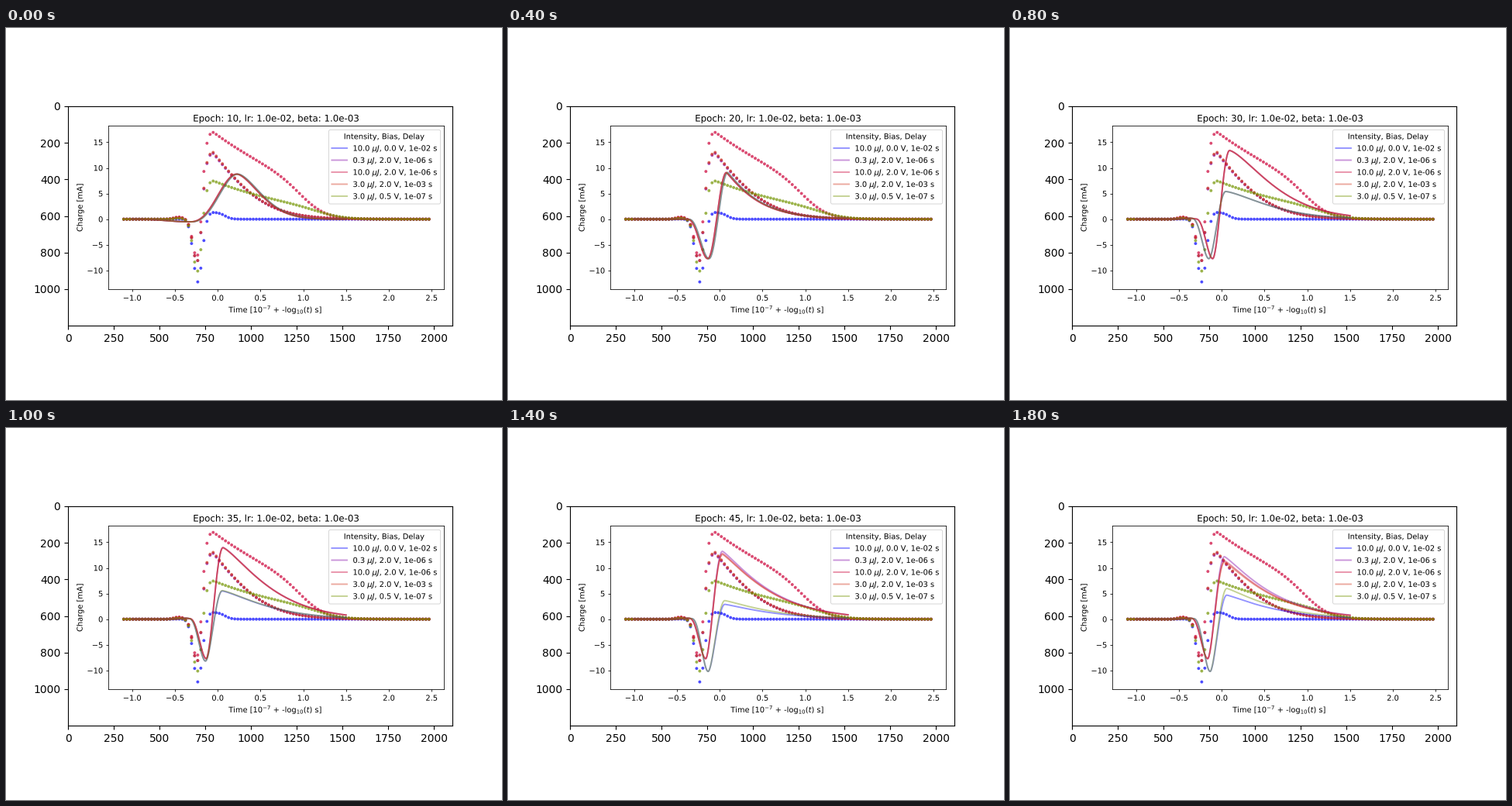
A matplotlib script that plays this animation: 640x480 px, repeating every 2000 ms.

```python
import matplotlib.pyplot as plt
import numpy as np
from matplotlib.animation import FuncAnimation
from matplotlib.lines import Line2D
from matplotlib.patches import FancyBboxPatch
from matplotlib.patheffects import Normal
from matplotlib.transforms import Affine2D

W, H, DPI = 640, 480, 100
EM = 496 / 700 * 10          # inner font size in points
PT = 72 / DPI                # points per pixel

# Label parts, colour, then the measured pulse:
# peak, dip, fade centre, fade width, slow decay
SERIES = [
    (("10.0", "0.0", "1e-02"), (0, 0, 1), (1.35, 12.4, 33, 1, 33)),
    (("0.3", "2.0", "1e-06"), (.5, 0, .65), (12.9, 9.6, 38, 9, 33)),
    (("10.0", "2.0", "1e-06"), (.8, 0, .22), (17, 9, 59, 4.2, 38)),
    (("3.0", "2.0", "1e-03"), (.82, .2, .1), (13.1, 9.6, 38, 9, 33)),
    (("3.0", "0.5", "1e-07"), (.45, .58, 0), (7.5, 11, 65, 4.5, 31)),
]
WEAK = (0, 4)
SPREAD = (0, .8, 0, -.3, 1.3)       # how far the peaks drift apart at the end
EPOCHS = sorted(range(5, 51, 5), key=str)    # alphabetical order of names


def ease(u, power=1):
    return (1 - np.cos(np.pi * np.clip(u, 0, 1) ** power)) / 2


def bell(x, mid, width):
    return np.exp(-((x - mid) / width) ** 2 / 2)


def pulse(i, peak, dip, centre, width, decay):
    """Measured signal: a sharp dip, a fast rise, then a slow fade."""
    rise = 1 / (1 + np.exp(-(i - 25.25) / .62))
    late = np.clip(i, 29, None)
    fade = np.exp((29 - late) / decay) / (1 + np.exp((late - centre) / width))
    fade *= 1 + np.exp((29 - centre) / width)
    return (peak * (rise * fade + .025 * bell(i, 17.8, 1.5))
            - dip * bell(i, 24.05, 1.48))


def fit(t, epoch, k):
    """Model curve: ease down to a dip, up to a peak, then a stretched tail."""
    weak = k in WEAK
    young = np.exp(-(epoch - 5) / 4.5)
    shift = np.interp(epoch, (20, 30, 40),
                      (.015, -.015, 0) if weak else (0, .03, -.028))

    dip_t = -.135 - 1.165 * young ** 1.6 + shift
    onset = dip_t - .19 - 1.4 * young
    dip = -7.7 * ease((epoch - 8) / 12)
    if weak:
        dip -= 2.5 * ease((epoch - 33) / 7)

    peak_t = .06 + .49 * young + shift
    peak = np.interp(epoch, (5, 10, 20, 30, 40, 45, 50),
                     (5.2, 8.8, 9.1, 5.4, 5.6, 2.9, 4.7) if weak else
                     (5.2, 8.8, 9.1, 13.4, 14.5, 12.8, 11.4))
    peak += SPREAD[k] * (max(epoch - 30, 0) / 20) ** 2

    ages = (5, 10, 20, 30, 40)
    scale = np.interp(epoch, ages, (.665, .38, .385, .65, .63))
    power = np.interp(epoch, ages, (2.25, 1.65, 1.1, 1.4, 1.18))

    fall = dip * ease((t - onset) / (dip_t - onset), 1.2)
    climb = ease((t - dip_t) / (peak_t - dip_t), .85 + .6 * young ** .4)
    tail = peak * np.exp(-(np.clip(t - peak_t, 0, None) / scale) ** power)
    bump = .2 * ease((epoch - 20) / 10) * bell(t, -.38, .05)
    return np.where(t < peak_t, fall + (peak - dip) * climb, tail) + bump


fig = plt.figure(figsize=(W / DPI, H / DPI), dpi=DPI, facecolor="white")
px = Affine2D().scale(1 / W, -1 / H).translate(0, 1) + fig.transFigure


def write(x, y, text, ha="center", size=EM, rotation=0):
    return fig.text(x, y, text, transform=px, ha=ha, va="baseline",
                    fontsize=size, rotation=rotation,
                    rotation_mode="anchor", path_effects=[Normal()])


# Outer picture frame
outer = fig.add_subplot()
outer.set(xlim=(-.5, 2099.5), ylim=(1199.5, -.5), aspect="equal")
outer.set_xticks(range(0, 2001, 250))
outer.set_yticks(range(0, 1001, 200))

# Inner chart
LEFT, RIGHT, TOP, BOTTOM = 132.2, 565.4, 126.5, 336.8
X0, Y0, X_UNIT, Y_UNIT = 273.2, 246.7, 110.4, 6.615
ax = fig.add_axes([LEFT / W, 1 - BOTTOM / H,
                   (RIGHT - LEFT) / W, (BOTTOM - TOP) / H])
ax.set_xlim((LEFT - X0) / X_UNIT, (RIGHT - X0) / X_UNIT)
ax.set_ylim((Y0 - BOTTOM) / Y_UNIT, (Y0 - TOP) / Y_UNIT)
ax.set_xticks(np.arange(-1, 2.6, .5))
ax.set_yticks(np.arange(-10, 16, 5))
ax.tick_params(length=.35 * EM, width=.08 * EM,
               labelbottom=False, labelleft=False)
for spine in ax.spines.values():
    spine.set_linewidth(.08 * EM)

for v in ax.get_xticks():
    write(X0 + v * X_UNIT, 351.7, f"{v:.1f}".replace("-", "\u2212"))
for v in ax.get_yticks():
    write(125.3, Y0 - v * Y_UNIT + 3.7, f"{v:.0f}".replace("-", "\u2212"),
          ha="right")
title = write(348.2, 120.6, "", size=1.2 * EM)
write(348.2, 367, r"Time [10$^{-7}$ + -log$_{10}$($t$) s]")
write(98.6, 231.6, "Charge [mA]", rotation=90)

# Legend box
fig.add_artist(FancyBboxPatch(
    (418.5, 133.4), 140.1, 91.6, boxstyle="round,pad=2,rounding_size=2",
    transform=px, fc="white", ec="0.8", lw=.1 * EM, alpha=.8))
write(488.2, 143.3, "Intensity, Bias, Delay")

# Dots, fitted lines and legend rows
i = np.arange(100)
samples = np.linspace((151.9 - X0) / X_UNIT, (545.8 - X0) / X_UNIT, 100)
t = np.linspace(-1, 1.5, 500)
lines = []
for k, ((energy, bias, delay), color, shape) in enumerate(SERIES):
    style = dict(color=color, lw=1.9 * PT, alpha=.42,
                 solid_capstyle="projecting")
    ax.scatter(samples, pulse(i, *shape), s=np.full(100, (3.9 * PT) ** 2),
               color=[color], alpha=.7, linewidths=0)
    lines += ax.plot([], [], **style)

    y = 155 + 15.5 * k
    fig.add_artist(Line2D([420.4, 440], [y, y], transform=px, snap=False,
                          **style))
    write(447.5, y + 3.6, rf"{energy} $\mu J$, {bias} V, {delay} s", ha="left")


def update(frame):
    epoch = EPOCHS[frame]
    for k, line in enumerate(lines):
        line.set_data(t, fit(t, epoch, k))
    title.set_text(f"Epoch: {epoch}, lr: 1.0e-02, beta: 1.0e-03")
    return [*lines, title]


anim = FuncAnimation(fig, update, frames=len(EPOCHS), interval=200,
                     repeat=True, repeat_delay=0)
plt.show()
```
